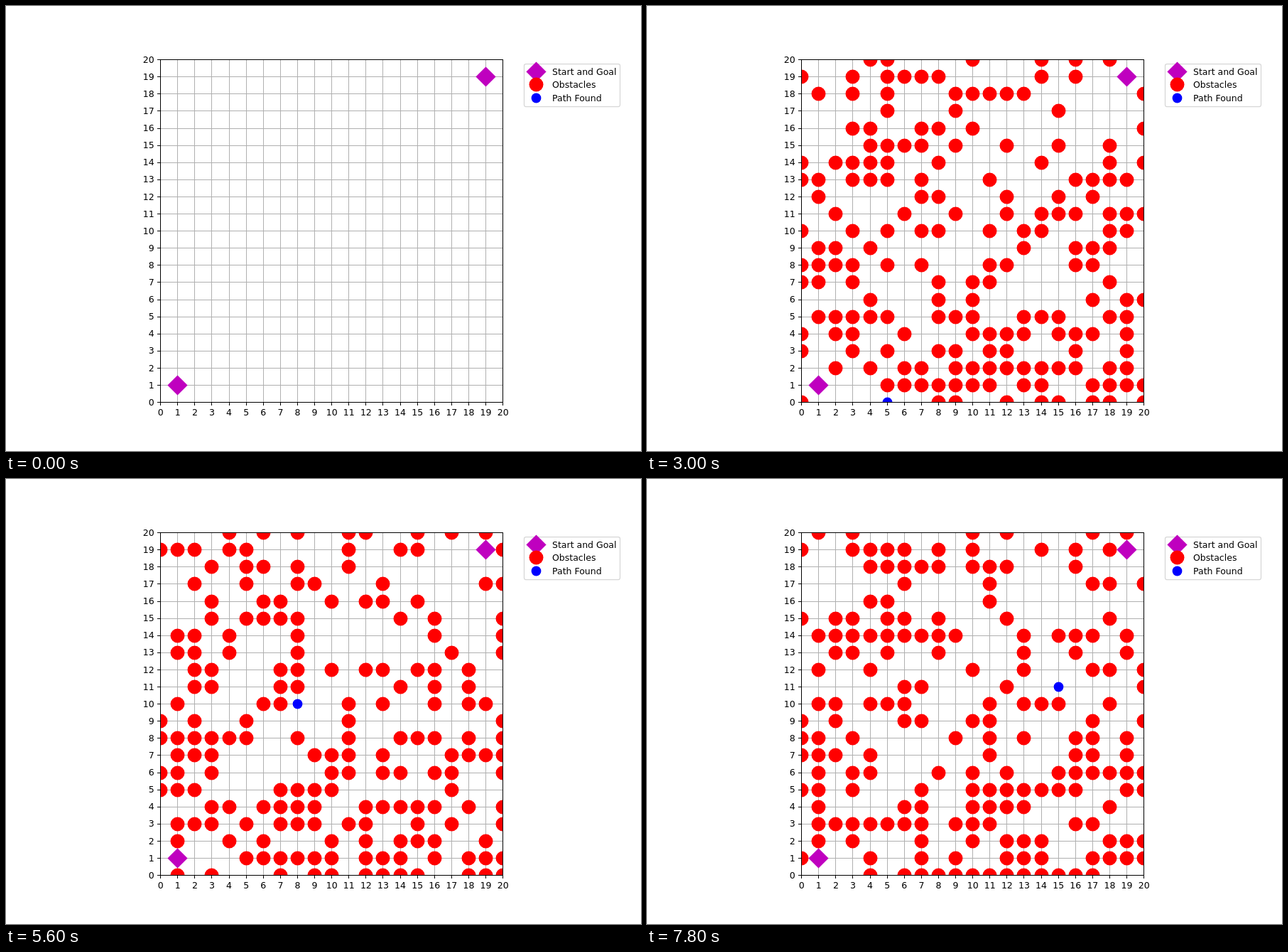
An HTML page for the animation above (8000 ms loop, 894 px wide and 626 px high).

```html
<!DOCTYPE html>
<html lang="en">
<head>
<meta charset="utf-8">
<title>Path planning among moving obstacles</title>
<style>
  html, body { margin: 0; width: 100%; height: 100%; overflow: hidden; background: #fff; }
  svg { display: block; }
  text { font: 12.5px "DejaVu Sans", sans-serif; }
  .grid { stroke: #b0b0b0; }
  .tick, .frame { stroke: #000; fill: none; }
  .x { text-anchor: middle; }
  .y { text-anchor: end; }
  .ends { fill: #bf00bf; }
  .obstacle { fill: #f00; }
  .agent { fill: #00f; }
</style>
</head>
<body>
<svg width="894" height="626" viewBox="0 0 894 626">
  <clipPath id="plot"><rect x="217.5" y="75.5" width="482" height="482"/></clipPath>
  <g id="grid"></g>
  <g clip-path="url(#plot)">
    <path id="obstacles" class="obstacle"/>
    <path id="agent" class="agent"/>
    <path id="ends" class="ends"/>
  </g>
  <rect class="frame" x="217.5" y="75.5" width="482" height="482"/>
  <g id="axes"></g>
  <rect x="729.5" y="81.5" width="135" height="60" rx="2.5" fill="#fff" stroke="#d6d6d6" stroke-width="1.25"/>
  <g id="legend"></g>
</svg>
<script>
const SIZE = 20, STEP_MS = 200, STEPS = 40;
const START = [1, 1], GOAL = [19, 19];
const $ = id => document.getElementById(id);
const px = x => 217.16 + 24.1 * x;
const py = y => 557.14 - 24.1 * y;
const snap = v => Math.floor(v + 0.5) + 0.5;

const disc = r => (x, y) => `M${x - r} ${y}a${r} ${r} 0 1 0 ${2 * r} 0a${r} ${r} 0 1 0 ${-2 * r} 0z`;
const diamond = r => (x, y) => `M${x - r} ${y}l${r} ${-r}l${r} ${r}l${-r} ${r}z`;
const marks = { ends: diamond(14.1), obstacle: disc(10), agent: disc(6.9) };
const markAt = (kind, [x, y]) => marks[kind](snap(px(x)), snap(py(y)));

function drawStatic() {
  const line = (cls, x1, y1, x2, y2) => `<line class="${cls}" x1="${x1}" y1="${y1}" x2="${x2}" y2="${y2}"/>`;
  let grid = '', axes = '';
  for (let i = 0; i <= SIZE; i++) {
    const x = snap(px(i)), y = snap(py(i));
    grid += line('grid', x, 75.5, x, 557.5) + line('grid', 217.5, y, 699.5, y);
    axes += line('tick', x, 557.5, x, 562) + line('tick', 213, y, 217.5, y)
      + `<text class="x" x="${px(i) + 0.5}" y="576">${i}</text>`
      + `<text class="y" x="208.6" y="${Math.round(py(i) + 4.6)}">${i}</text>`;
  }
  $('grid').innerHTML = grid;
  $('axes').innerHTML = axes;
  $('ends').setAttribute('d', markAt('ends', START) + markAt('ends', GOAL));
  $('legend').innerHTML = [
    ['ends', 'Start and Goal'], ['obstacle', 'Obstacles'], ['agent', 'Path Found']
  ].map(([kind, label], i) => {
    const y = 92.5 + Math.round(18.4 * i);
    return `<path class="${kind}" d="${marks[kind](746.5, y)}"/><text x="769" y="${y + 4}">${label}</text>`;
  }).join('');
}

// Waypoints: step, x, y. Between them the agent moves one axis at a time.
const route = [[0, 1, 1], [4, 1, 1], [6, 2, 0], [15, 5, 0], [21, 6, 5], [28, 8, 10], [35, 12, 11], [39, 15, 11]];

function agentPosition(step) {
  const next = Math.max(1, route.findIndex(p => p[0] >= step));
  const [k0, x0, y0] = route[next - 1], [k1, x1, y1] = route[next];
  const dx = x1 - x0, dy = y1 - y0, length = Math.abs(dx) + Math.abs(dy);
  const moved = Math.floor(length * (step - k0) / (k1 - k0));
  const movedX = length && Math.floor(moved * Math.abs(dx) / length);
  return [x0 + Math.sign(dx) * movedX, y0 + Math.sign(dy) * (moved - movedX)];
}

let seed = 41;
function random() {
  seed = (seed * 1664525 + 1013904223) % 4294967296;
  return seed / 4294967296;
}
const inside = v => v >= 0 && v <= SIZE;
const same = (a, b) => a[0] === b[0] && a[1] === b[1];

// Obstacles are scattered over the grid, thinner in a few clearings.
const clearings = [[5, 1], [8, 8], [11, 14], [16, 19]];
function scatter() {
  const walkers = [];
  for (let x = 0; x <= SIZE; x++) {
    for (let y = 0; y <= SIZE; y++) {
      const open = clearings.some(([cx, cy]) => Math.hypot(x - cx, y - cy) < 2.9);
      const taken = [START, GOAL].some(c => same(c, [x, y]));
      if (random() < (open ? 0.2 : 0.46) && !taken) walkers.push({ home: [x, y], at: [x, y] });
    }
  }
  return walkers;
}

// Each obstacle wanders to free cells next to its home.
function buildSteps() {
  const walkers = scatter();
  const steps = [{ obstacles: '', agent: '' }];
  for (let k = 1; k < STEPS; k++) {
    const agent = agentPosition(k);
    const isFree = cell => cell.every(inside)
      && ![START, GOAL, agent].some(c => same(c, cell))
      && !walkers.some(w => same(w.at, cell));
    for (const w of walkers) {
      const cell = [...w.at];
      cell[random() < 0.5 ? 0 : 1] += random() < 0.5 ? -1 : 1;
      const near = cell.every((v, i) => Math.abs(v - w.home[i]) <= 1);
      if (near && isFree(cell)) w.at = cell;
    }
    steps.push({
      obstacles: walkers.filter(w => !same(w.at, agent)).map(w => markAt('obstacle', w.at)).join(''),
      agent: markAt('agent', agent)
    });
  }
  return steps;
}

drawStatic();
const steps = buildSteps();
let shown = -1;
function render() {
  const k = Math.floor(performance.now() / STEP_MS) % STEPS;
  if (k !== shown) {
    $('obstacles').setAttribute('d', steps[k].obstacles);
    $('agent').setAttribute('d', steps[k].agent);
    shown = k;
  }
  requestAnimationFrame(render);
}
render();
</script>
</body>
</html>
```
